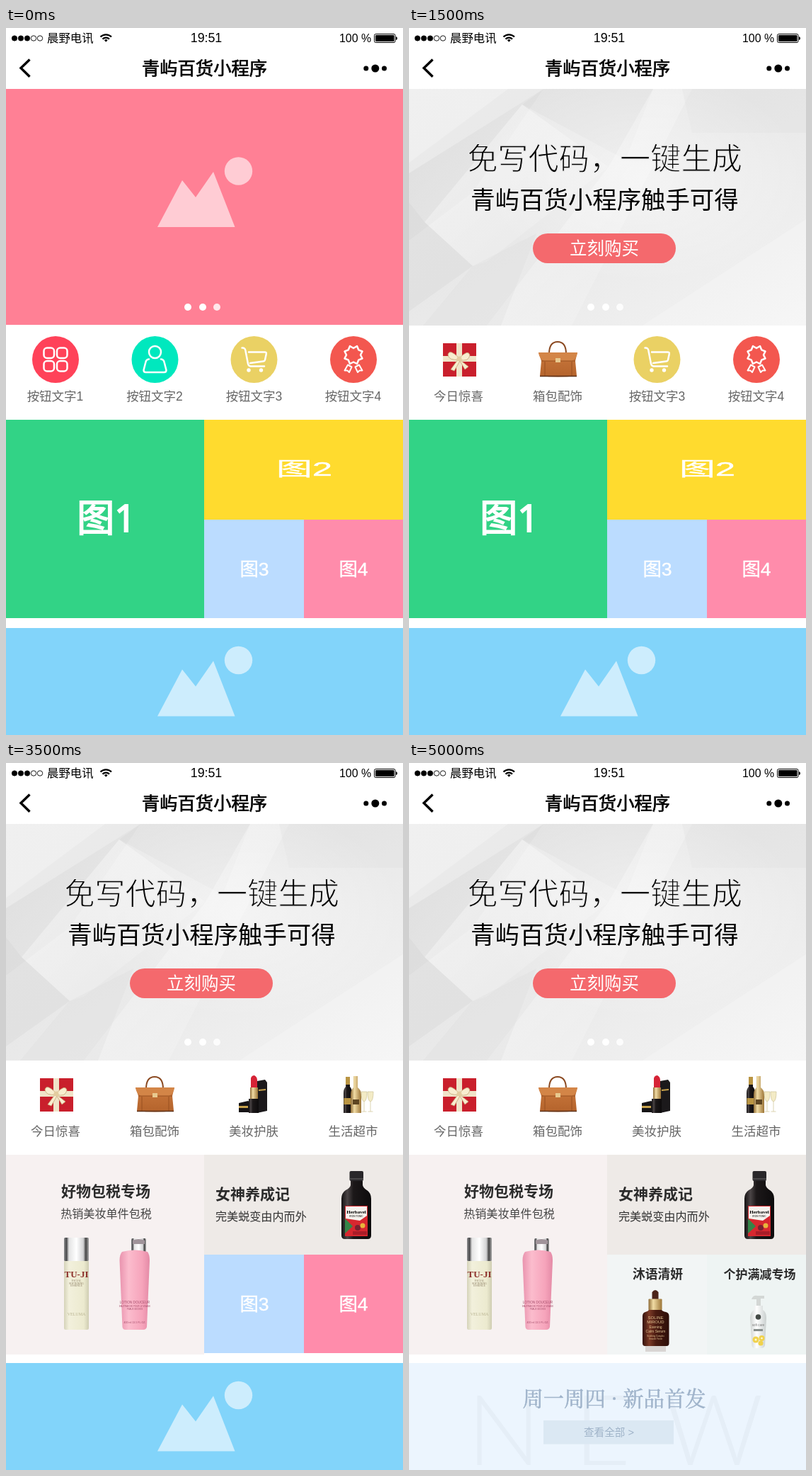
Animation, 561 px wide and 998 px high, one loop 5.5 s. Source, as an HTML page:

```html
<!DOCTYPE html>
<html lang="zh-CN">
<head>
<meta charset="utf-8">
<title>小程序</title>
<style>
@property --n { syntax: "<integer>"; inherits: true; initial-value: 0; }
@keyframes tick { from { --n: 0; } to { --n: 11; } }
html, body { margin: 0; width: 100%; height: 100%; overflow: hidden; background: #fff; }
svg {
  display: block; width: 100vw; height: 100vh;
  font-family: "Liberation Sans", "Noto Sans CJK SC", "Noto Sans CJK", sans-serif;
  animation: tick 5500ms steps(11) -8ms infinite;
}
/* A layer shows from its step until the loop ends. */
.layer { opacity: clamp(0, var(--n) - var(--at) + 1, 1); }
.mid { text-anchor: middle; }
.label { font-size: 17.5px; fill: #666; text-anchor: middle; }
.pic { fill: #fff; stroke: #fff; stroke-width: .4; text-anchor: middle; }
.head { font-weight: 700; fill: #2b2b2b; }
/* A rim in the backdrop's colour makes the strokes lighter. */
.thin { stroke: #ebebeb; stroke-width: 1.3; }
.line { fill: none; stroke: #fff; stroke-width: 2.5; stroke-linejoin: round; stroke-linecap: round; }
.serif { font-family: "Noto Serif CJK SC", "Noto Serif", "Liberation Serif", serif; }
</style>
</head>
<body>
<svg viewBox="0 0 561 998" preserveAspectRatio="none">
<defs>
  <g id="hill" fill="#fff" fill-opacity=".6">
    <path d="M214 281 249 215 268 239 293 203 323.500 281z"/>
    <circle cx="328.500" cy="202" r="19.700"/>
  </g>
  <linearGradient id="paper" x2="1" y2="1">
    <stop offset="0" stop-color="#ebebeb"/><stop offset=".45" stop-color="#e8e8e8"/><stop offset="1" stop-color="#f3f3f3"/>
  </linearGradient>
  <radialGradient id="glow">
    <stop offset="0" stop-color="#fff" stop-opacity=".5"/><stop offset="1" stop-color="#fff" stop-opacity="0"/>
  </radialGradient>
  <linearGradient id="fold" x2="1" y2="1">
    <stop offset="0" stop-color="#fff" stop-opacity=".5"/><stop offset="1" stop-color="#fff" stop-opacity="0"/>
  </linearGradient>
  <linearGradient id="shade" x2="1" y2="1">
    <stop offset="0" stop-color="#bbb" stop-opacity=".3"/><stop offset="1" stop-color="#ccc" stop-opacity="0"/>
  </linearGradient>
  <linearGradient id="silver">
    <stop offset="0" stop-color="#8b8c8e"/><stop offset=".1" stop-color="#4a4a4c"/><stop offset=".2" stop-color="#e4e4e4"/>
    <stop offset=".5" stop-color="#fff"/><stop offset=".78" stop-color="#d2d2d3"/><stop offset=".88" stop-color="#444"/><stop offset="1" stop-color="#aaa"/>
  </linearGradient>
  <linearGradient id="cream">
    <stop offset="0" stop-color="#d5d3b9"/><stop offset=".2" stop-color="#f2f0dc"/><stop offset=".8" stop-color="#eceacf"/><stop offset="1" stop-color="#cfcdb2"/>
  </linearGradient>
  <linearGradient id="rose">
    <stop offset="0" stop-color="#e993ae"/><stop offset=".3" stop-color="#fbbccd"/><stop offset=".75" stop-color="#f6a4bb"/><stop offset="1" stop-color="#e48aa6"/>
  </linearGradient>
  <linearGradient id="gold">
    <stop offset="0" stop-color="#8d6a35"/><stop offset=".35" stop-color="#f1dca5"/><stop offset="1" stop-color="#9c7537"/>
  </linearGradient>
  <linearGradient id="amber">
    <stop offset="0" stop-color="#34120c"/><stop offset=".25" stop-color="#7c3a26"/><stop offset=".5" stop-color="#4a1b11"/><stop offset="1" stop-color="#2c0e09"/>
  </linearGradient>
  <linearGradient id="ink">
    <stop offset="0" stop-color="#141112"/><stop offset=".2" stop-color="#4b4546"/><stop offset=".4" stop-color="#1c1819"/><stop offset="1" stop-color="#0d0b0c"/>
  </linearGradient>
  <linearGradient id="pearl">
    <stop offset="0" stop-color="#cfd3d2"/><stop offset=".4" stop-color="#fff"/><stop offset="1" stop-color="#c9cfce"/>
  </linearGradient>
  <linearGradient id="leather" x2="0" y2="1">
    <stop offset="0" stop-color="#c9783c"/><stop offset="1" stop-color="#b4632c"/>
  </linearGradient>
  <clipPath id="foot"><path d="M0 847h561v151H0z"/></clipPath>
  <clipPath id="top"><path d="M0 86h561v334H0z"/></clipPath>
</defs>

<!-- Status and title bars -->
<g stroke="#000">
  <circle cx="12" cy="14.500" r="3.600"/><circle cx="21" cy="14.500" r="3.600"/><circle cx="30" cy="14.500" r="3.600"/>
  <g fill="none" stroke-width=".9"><circle cx="39" cy="14.500" r="3.700"/><circle cx="48" cy="14.500" r="3.700"/></g>
</g>
<text x="58" y="20" font-size="16.400">晨野电讯</text>
<g fill="none" stroke="#000" stroke-width="2.200">
  <path d="M133.500 12.500a11 11 0 0 1 15.500 0M136.500 15.600a6.700 6.700 0 0 1 9.500 0"/>
  <path d="M138.900 17.300 141.250 19.700 143.600 17.300a3.300 3.300 0 0 0-4.700 0z" fill="#000" stroke="none"/>
</g>
<text class="mid" x="283" y="20" font-size="17.800">19:51</text>
<text x="471" y="20" font-size="15.900">100 %</text>
<rect x="520.500" y="8.500" width="29.500" height="12" rx="2" fill="none" stroke="#000"/>
<rect x="522" y="10" width="26.500" height="9" rx="1"/>
<path d="M551 12q2 .5 2 2.500t-2 2.500z"/>
<path d="M33.500 44.500 21 56.500 33.500 68.800" fill="none" stroke="#000" stroke-width="3.400"/>
<text class="mid" x="280.500" y="66" font-size="25.300" stroke="#000" stroke-width=".7">青屿百货小程序</text>
<circle cx="508.800" cy="57" r="3.500"/><circle cx="521.800" cy="57" r="5.500"/><circle cx="534.500" cy="57" r="3.500"/>

<!-- Banner -->
<path d="M0 86h561v333H0z" fill="#ff8095"/>
<use href="#hill"/>
<g class="layer" style="--at:1" clip-path="url(#top)">
  <path d="M0 86h561v334H0z" fill="url(#paper)"/>
  <path d="M0 86H140L0 190z" fill="#f3f3f3" opacity=".6"/>
  <path d="M0 205 190 86 90 232 0 300z" fill="url(#shade)"/>
  <path d="M0 246 22 274 90 336 0 400z" fill="#c9c9c9" opacity=".25"/>
  <path d="M22 274 160 108 282 196 110 330 90 336z" fill="url(#fold)"/>
  <path d="M160 108 190 86H345L306 186z" fill="#d3d3d3" opacity=".3"/>
  <path d="M282 196 345 86H400L230 420H110z" fill="url(#fold)"/>
  <path d="M386 86H561V148H400z" fill="#dcdcdc" opacity=".35"/>
  <ellipse cx="330" cy="210" rx="230" ry="150" fill="url(#glow)"/>
  <path d="M561 270V420H330z" fill="#fff" opacity=".2"/>
  <path d="M90 336 180 290 130 420H20z" fill="#d2d2d2" opacity=".2"/>
  <text class="mid thin" x="276.500" y="200" font-size="43.200">免写代码，一键生成</text>
  <text class="mid" x="276.500" y="255" font-size="34.400">青屿百货小程序触手可得</text>
  <rect x="175" y="290" width="202" height="42" rx="21" fill="#f4696d"/>
  <text class="mid" x="276" y="320" font-size="24.500" fill="#fff">立刻购买</text>
</g>
<g fill="#fff">
  <circle cx="257" cy="394" r="5"/><circle cx="278" cy="394" r="5"/><circle cx="298" cy="394" r="5" opacity=".8"/>
</g>

<!-- Round buttons -->
<circle cx="70" cy="468" r="33" fill="#ff4259"/>
<g class="line">
  <rect x="53.500" y="451.500" width="14.500" height="14.500" rx="4.500"/><rect x="72" y="451.500" width="14.500" height="14.500" rx="4.500"/>
  <rect x="53.500" y="470" width="14.500" height="14.500" rx="4.500"/><rect x="72" y="470" width="14.500" height="14.500" rx="4.500"/>
</g>
<text class="label" x="69.500" y="526">按钮文字1</text>

<circle cx="210.500" cy="468" r="33" fill="#00e8be"/>
<g class="line">
  <circle cx="210.500" cy="457.500" r="8.500"/>
  <path d="M202 467.500Q198 468 197.300 472L194.500 483Q194.500 486 197.500 486H223.500Q226.500 486 226.500 483L223.700 472Q223 468 219 467.500"/>
</g>
<text class="label" x="210" y="526">按钮文字2</text>

<circle cx="350.500" cy="468" r="33" fill="#ead164"/>
<path class="line" d="M333.500 451.500Q338 451 338.500 456L342 474Q342.800 477.500 346 477.500H365M343 457.500H365.500Q368.300 457.500 367.800 460L366 468.500Q365.600 470.300 363.500 470.600L345 473"/>
<g fill="#fff"><circle cx="343" cy="483" r="2.700"/><circle cx="360.500" cy="483" r="2.700"/></g>
<text class="label" x="350.500" y="526">按钮文字3</text>

<circle cx="491" cy="468" r="33" fill="#f3574f"/>
<g class="line" transform="translate(491 461.500)">
  <path d="M0-9.500 5-12.500 7.200-7.200 12.500-5 10 0 12.500 5 7.200 7.200 5 12.500 0 10-5 12.500-7.200 7.200-12.500 5-10 0-12.500-5-7.200-7.200-5-12.500z"/>
  <path d="M-8 14-12.500 22-8.500 22-6 24.500-2.500 17zM8 14 12.500 22 8.500 22 6 24.500 2.500 17z" stroke-width="2"/>
</g>
<text class="label" x="490.500" y="526">按钮文字4</text>

<g class="layer" style="--at:2">
  <path d="M28 433h82v97H28z" fill="#fff"/>
  <path d="M48 445h47v47H48z" fill="#c91f2c"/>
  <path d="M48 463h47v8H48zM67 445h8v47h-8z" fill="#f0e3c8"/>
  <path d="M71 466Q57 452 55 461 56 470 71 468 84 472 86 462 84 453 71 466zM70 467 59 482 64 484 72 470 79 482 84 478z" fill="#f8edcf" stroke="#c4a876" stroke-width=".8"/>
  <circle cx="71" cy="467" r="3.500" fill="#e3cda0"/>
  <text class="label" x="70" y="526">今日惊喜</text>
</g>
<g class="layer" style="--at:3">
  <path d="M168 433h83v97h-83z" fill="#fff"/>
  <path d="M198 460Q198 443 210 443T222 460" fill="none" stroke="#8b4a22" stroke-width="2"/>
  <path d="M183 458H238L235 470 237 491Q210 494 185 491L187 470z" fill="url(#leather)"/>
  <path d="M183 458H238Q237 467 230 470H191Q184 467 183 458z" fill="#d38547"/>
  <path d="M187 470H235M192 471V491M230 471V491" stroke="#985020" fill="none"/>
  <path d="M207 466h7v6h-7z" fill="#e8c98f"/>
  <path d="M185 491.500H237" stroke="#5b3018" stroke-width="1.500"/>
  <text class="label" x="210" y="526">箱包配饰</text>
</g>
<g class="layer" style="--at:4">
  <path d="M309 433h83v97h-83z" fill="#fff"/>
  <path d="M355 449 366 447 369 451V491L355 494z" fill="#1b191b"/>
  <path d="M329 480 342 477 347 480V493H329z" fill="#161416"/>
  <path d="M329 484h13v3h-13zM357 461l10-1v2l-10 1z" fill="#c7a24c"/>
  <path d="M346 459V445Q347 441 351 441 355 443 355 448V459z" fill="#d62336"/>
  <path d="M345 458h11v17h-11z" fill="url(#gold)"/>
  <path d="M343 474h14v20h-14z" fill="url(#ink)"/>
  <text class="label" x="350" y="526">美妆护肤</text>
</g>
<g class="layer" style="--at:5">
  <path d="M449 433h84v97h-84z" fill="#fff"/>
  <path d="M480 443h6v14q3 3 3 9v28h-12v-28q0-6 3-9z" fill="url(#ink)"/>
  <path d="M480 443h6v11h-6zM477.500 473h11v9h-11z" fill="#b99543"/>
  <path d="M491 442h6v16q5 4 5 10v26h-15v-26q0-6 4-10z" fill="url(#gold)"/>
  <path d="M490 475h9v7h-9z" fill="#5d4522"/>
  <g fill="#f3ebc6" stroke="#d3c99f" stroke-width=".8">
    <path d="M502 464h8q0 13-4 14-4-1-4-14zM511 464h8q0 13-4 14-4-1-4-14z"/>
    <path d="M506 478v14m-3.500 0h7M515 478v14m-3.500 0h7"/>
  </g>
  <text class="label" x="490.500" y="526">生活超市</text>
</g>

<!-- Tiles -->
<path d="M0 553h280v280H0z" fill="#32d386"/>
<path d="M280 553h281v141H280z" fill="#ffdb2e"/>
<path d="M280 694h141v139H280z" fill="#bbdcff"/>
<path d="M421 694h140v139H421z" fill="#ff8cab"/>
<g class="pic">
  <text x="142" y="711" font-size="53" stroke-width="1.800" style="font-family:'Noto Sans','Noto Sans CJK SC',sans-serif">图1</text>
  <text transform="translate(421.500 632) scale(1.850 1)" font-size="27.500">图2</text>
  <text x="351" y="773" font-size="26.500">图3</text>
  <text x="491" y="773" font-size="26.500">图4</text>
</g>

<g class="layer" style="--at:6">
  <path d="M0 553h280v282H0z" fill="#f7f1f1"/>
  <text class="mid head" x="141" y="611.500" font-size="21">好物包税专场</text>
  <text class="mid" x="141.500" y="641.500" font-size="16.100" fill="#444">热销美妆单件包税</text>
  <rect x="82" y="702" width="35" height="98" rx="2.500" fill="url(#cream)"/>
  <rect x="82" y="670" width="35" height="33" rx="1.500" fill="url(#silver)"/>
  <g class="mid" style="font-family:'Liberation Serif',serif" fill="#8a7b62">
    <text x="99.500" y="726" font-size="13" font-weight="700" fill="#8c2f2a">TU-JI</text>
    <g font-size="3.800"><text x="99.500" y="732">FACIAL</text><text x="99.500" y="735.500">SOFTENING</text><text x="99.500" y="739">ESSENCE</text></g>
    <text x="99.500" y="780" font-size="6" fill="#b9b391">VELUMA</text>
  </g>
  <rect x="177" y="671" width="21" height="20" rx="2" fill="url(#silver)"/>
  <path d="M179 674Q187 670 196 674V679H179z" fill="#a0949a"/>
  <path d="M164 690Q182 685 200 690 203 694 203 702L199 796Q198 800 194 800H169Q165 800 164.500 796L160.500 702Q160.500 694 164 690z" fill="url(#rose)"/>
  <g class="mid" fill="#a34c69">
    <text x="182" y="763" font-size="4.700">LOTION DOUCEUR</text>
    <text x="182" y="768" font-size="2.900">EAU FRAICHE POUR LE VISAGE</text>
    <text x="182" y="772" font-size="2.900">PEAUX SECHES</text>
    <text x="182" y="791" font-size="3.600">400 ml 13.5 FL.OZ.</text>
  </g>
</g>

<g class="layer" style="--at:7">
  <path d="M280 553h281v141H280z" fill="#eeeae7"/>
  <text class="head" x="296" y="615.500" font-size="21">女神养成记</text>
  <text x="296" y="645.500" font-size="16.100" fill="#333">完美蜕变由内而外</text>
  <path d="M487 590H504V596Q505 600 510 603 516 607 516 615V667Q516 672 511 672H479Q474 672 474 667V615Q474 607 480 603 486 600 487 596z" fill="url(#ink)"/>
  <rect x="485.500" y="576" width="19.500" height="14" rx="2" fill="#29272a"/>
  <path d="M485.500 587h19.500" stroke="#777" stroke-width=".8"/>
  <path d="M479 625h32v43h-32z" fill="#d7272f"/>
  <path d="M480 626h30v13l-10 7-20-3z" fill="#f6f3ee"/>
  <path d="M479 643 490 654 479 664z" fill="#348447"/>
  <circle cx="497" cy="656" r="4" fill="#79202f"/><circle cx="504" cy="653" r="3.500" fill="#e7b53b"/><path d="M490 661h20v5h-20z" fill="#a91d28"/>
  <text class="mid" x="495" y="636" font-size="7" font-weight="700" style="font-family:'Liberation Serif',serif">Herbavel</text>
  <text class="mid" x="495" y="641" font-size="3.300">IRON TONIC</text>
</g>

<g class="layer" style="--at:8">
  <path d="M280 694h141v141H280z" fill="#f2f5f5"/>
  <text class="mid head" x="351.500" y="728" font-size="17.800">沐语清妍</text>
  <path d="M343.500 757V747Q348 741 352.500 747V757z" fill="#4c241a"/>
  <rect x="338.500" y="756.500" width="19" height="16" rx="1" fill="url(#gold)"/>
  <path d="M334 823h29v8h-29z" fill="#4a1b11" opacity=".15"/>
  <path d="M339 772H357Q358 774 363 775 367.500 776 367.500 781V819Q367.500 823 364 823H333.500Q330 823 330 819V781Q330 776 334 775 338 774 339 772z" fill="url(#amber)"/>
  <g class="mid" fill="#e2c695">
    <text x="348.500" y="785" font-size="6">SOLINE</text><text x="348.500" y="791" font-size="6">MIROUD</text>
    <text x="348.500" y="798" font-size="5">Evening</text><text x="348.500" y="803.500" font-size="5">Calm Serum</text>
    <text x="348.500" y="810" font-size="3">Soothing Complex</text><text x="348.500" y="814" font-size="3">Smooth Finish</text>
  </g>
</g>

<g class="layer" style="--at:9">
  <path d="M421 694h140v141H421z" fill="#eef4f3"/>
  <text class="mid head" x="495.500" y="728" font-size="17">个护满减专场</text>
  <path d="M484 757Q486 751 492 752H502V756H497V769H491V757z" fill="#d3d7d5"/>
  <path d="M488 766H500V772Q505 775 505 783L503 822Q502 826 498 826H489Q485 826 484.500 822L482 783Q482 775 488 772z" fill="url(#pearl)"/>
  <circle cx="493.500" cy="782" r="3.800" fill="#444a46"/>
  <text class="mid" x="493.500" y="795" font-size="4.500" fill="#777">soft care</text>
  <path d="M487 799h13v3h-13z" fill="#868d8a"/>
  <g fill="#f0d24c"><circle cx="490" cy="814" r="4.500"/><circle cx="498.500" cy="812" r="4"/><circle cx="497" cy="819" r="3.500"/></g>
  <g fill="#fff8d5"><circle cx="490" cy="814" r="1.500"/><circle cx="498.500" cy="812" r="1.300"/></g>
</g>

<!-- Foot banner -->
<path d="M0 847h561v151H0z" fill="#82d4fa"/>
<use href="#hill" y="690.500"/>
<g class="layer" style="--at:10" clip-path="url(#foot)">
  <path d="M0 847h561v151H0z" fill="#ecf5fe"/>
  <text x="82" y="991" font-size="138" font-weight="300" letter-spacing="47" fill="#e5eef7" style="font-family:Lato,Inter,sans-serif">NEW</text>
  <text class="mid serif" x="290" y="908" font-size="29.300" fill="#9fb3ca" stroke="#9fb3ca" stroke-width=".5">周一周四 · 新品首发</text>
  <path d="M190 928h184v33.500H190z" fill="#dbe8f3"/>
  <text class="mid" x="282.500" y="949.500" font-size="14.600" fill="#9fb3c8">查看全部 &gt;</text>
</g>
</svg>
</body>
</html>
```
